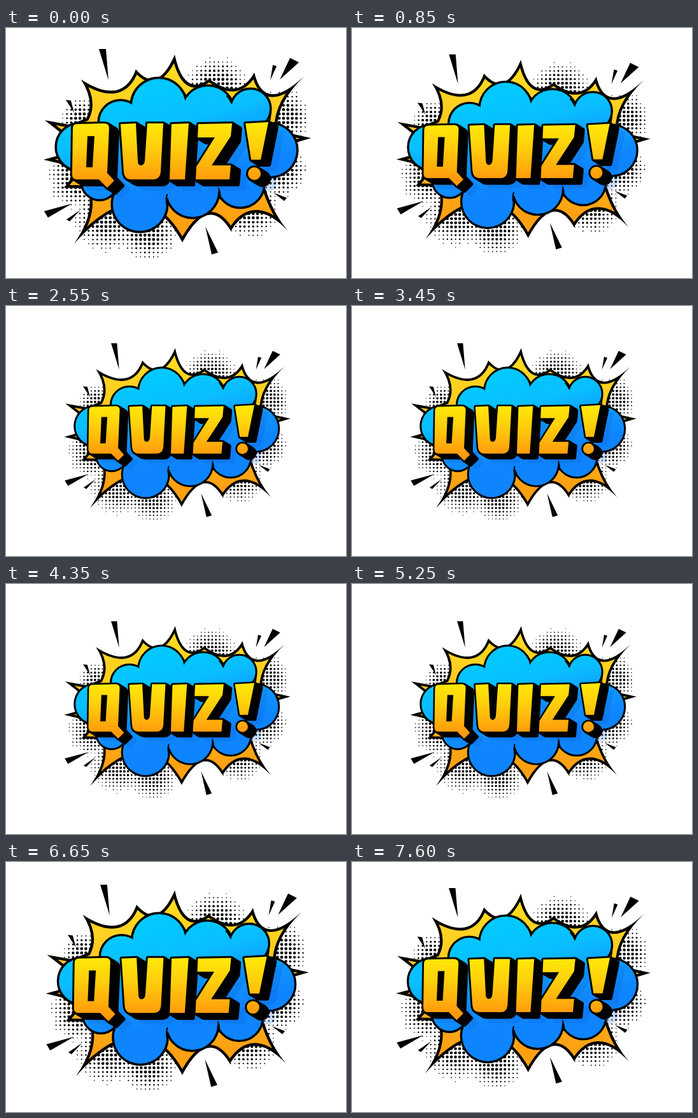
Write an HTML page that moves like this. It is 534 by 393 pixels and loops after 7650 ms.

```html
<!DOCTYPE html>
<html lang="en">
<head>
<meta charset="utf-8">
<title>Quiz burst</title>
<style>
  html, body { margin: 0; width: 100%; height: 100%; overflow: hidden; background: #fff; }
  svg { display: block; width: 100vw; height: 100vh; }
</style>
</head>
<body>
<svg viewBox="0 0 534 393" role="img" aria-label="QUIZ!">
  <defs>
    <linearGradient id="blue" gradientUnits="userSpaceOnUse" x1="0" y1="160" x2="39" y2="310">
      <stop offset="0" stop-color="#02c8ff"/><stop offset=".35" stop-color="#0abeff"/>
      <stop offset=".8" stop-color="#1090ff"/><stop offset="1" stop-color="#0f84ff"/>
    </linearGradient>
    <linearGradient id="gold" gradientUnits="userSpaceOnUse" x1="0" y1="150" x2="0" y2="242">
      <stop offset="0" stop-color="#ffe808"/><stop offset=".4" stop-color="#ffcf0c"/>
      <stop offset="1" stop-color="#ff980c"/>
    </linearGradient>
    <linearGradient id="amber" gradientUnits="userSpaceOnUse" x1="0" y1="60" x2="0" y2="300">
      <stop offset="0" stop-color="#ffdc20"/><stop offset=".4" stop-color="#ffc822"/>
      <stop offset="1" stop-color="#fda012"/>
    </linearGradient>
    <path id="star" d="M118,81 Q183,123 204,65 Q238,105 265,42 Q280,110 319,80 Q365,115 390,70
      Q405,135 468,76 Q425,118 426,158 L452,167 L479,173 L452,181 L405,245 Q418,290 443,319
      Q388,262 353,319 Q318,260 277,337 Q215,220 107,339 Q138,295 130,260 L124,252 L91,251
      L108,230 L84,213 L59,207 L84,200 L84,163 L61,145 L100,152 L126,142 Q140,115 118,81Z"/>
    <clipPath id="starClip"><use href="#star"/></clipPath>
    <path id="word" fill-rule="evenodd" d="
      M112,151 L154,150 Q162,150 162,157 L159,228 L170,240 L159,251 L146,238 H111 Q104,238 104,230 L105,158 Q105,151 112,151Z
      M128,170 L126,219 H136 L139,170Z
      M180,151 L204,150 L207,209 Q207,216 212,216 Q217,216 218,209 L222,150 H247 L243,226 Q242,238 231,238 H196 Q186,238 185,226Z
      M260,151 L287,150 L281,238 H257Z
      M302,151 L355,150 L353,170 L323,216 H353 L351,238 H298 L299,218 L328,172 H301Z
      M376,150 L412,148 L400,207 H385Z
      M380,229 A10,10 0 1 1 400,229 A10,10 0 1 1 380,229Z"/>
  </defs>
  <rect width="534" height="393" fill="#fff"/>
  <g id="burst">
    <path id="dots"/>
    <path d="M146,33 L157,33 L161,82Z M446,47 L460,54 L430,81Z M419,58 L425,60 L415,82Z
      M94,113 L102,114 L107,133Z M60,288 L66,298 L104,276Z M95,301 L100,304 L117,286Z
      M313,312 L333,353 L323,356Z M420,259 L441,267 L437,272Z"/>
    <g clip-path="url(#starClip)">
      <use href="#star" fill="url(#amber)" stroke="#000" stroke-width="9"/>
    </g>
    <g id="outline" stroke="#000" stroke-width="7"></g>
    <g id="cloud" fill="url(#blue)"></g>
    <path fill="none" stroke="#000" stroke-width="2.2" stroke-linecap="round"
      d="M283,108 Q281,102 275,98 M354,118 Q351,111 347,107
      M415,134 Q416,142 412,150 M254,282 Q250,272 253,262 M336,268 Q337,260 334,252"/>
    <use href="#word" transform="translate(23,15)" fill="#0758c8" stroke="#0758c8" stroke-width="5" opacity=".2"/>
    <g id="depth" stroke="#000" stroke-width="6" stroke-linejoin="round"></g>
    <use href="#word" fill="url(#gold)"/>
  </g>
</svg>
<script>
const LOOP = 7650, BEAT = 900, RISE = 300, STEP = 50;
const LEAD = 150;              // the loop opens halfway up a beat
const SMALL = 0.846, LARGE = 1.155;
const CX = 269.5, CY = 199;
const $ = id => document.getElementById(id);

const lobes = [
  [116, 187, 37], [180, 148, 34], [240, 122, 43], [317, 132, 41], [384, 127, 31],
  [415, 192, 42], [368, 245, 37], [293, 257, 41], [210, 277, 43], [147, 242, 28]
];
const circles = lobes.map(([x, y, r]) => `<circle cx="${x}" cy="${y}" r="${r - 1}"/>`).join('');
$('outline').innerHTML = circles;
$('cloud').innerHTML = circles + '<path d="M120,160 L240,110 L390,130 L430,200 L370,250 L200,275 L120,220Z"/>';

const DEPTH_X = 13, DEPTH_Y = 8;
let depth = '';
for (let i = 0; i <= DEPTH_X; i++)
  depth += `<use href="#word" transform="translate(${i},${(i * DEPTH_Y / DEPTH_X).toFixed(2)})"/>`;
$('depth').innerHTML = depth;

// Halftone: dots on a square grid shrink unevenly away from a few centres.
const patches = [
  [330, 95, 52], [120, 145, 36], [112, 236, 50], [160, 298, 56], [222, 318, 50],
  [436, 138, 44], [430, 222, 46], [382, 285, 48]
];
const PITCH = 6.8;
const noise = (i, j) => Math.abs(Math.sin(i * 12.9898 + j * 78.233) * 43758.5453) % 1;
let dots = '';
for (let j = 0; j < 48; j++) {
  for (let i = 0; i < 64; i++) {
    const x = 55 + i * PITCH, y = 40 + j * PITCH;
    const near = Math.max(...patches.map(([px, py, size]) => 1 - Math.hypot(x - px, y - py) / size))
      - 0.15 * noise(i, j);
    if (near < 0) continue;
    const r = Math.min(2.4, 0.7 + near * 3);
    dots += `M${(x - r).toFixed(2)},${y.toFixed(2)}a${r},${r} 0 1 0 ${2 * r},0a${r},${r} 0 1 0 ${-2 * r},0`;
  }
}
$('dots').setAttribute('d', dots);

// Steady growth, then a decelerating return.
function scaleAt(time) {
  const phase = (time + LEAD) % BEAT;
  const lift = phase < RISE
    ? phase / RISE
    : ((BEAT - phase) / (BEAT - RISE)) ** 2;
  return SMALL + (LARGE - SMALL) * lift;
}

function draw(ms) {
  const time = Math.floor((ms % LOOP) / STEP) * STEP;
  $('burst').setAttribute('transform',
    `translate(${CX},${CY}) scale(${scaleAt(time).toFixed(4)}) translate(${-CX},${-CY})`);
}

const start = performance.now();
function tick() {
  draw(performance.now() - start);
  requestAnimationFrame(tick);
}
draw(0);
requestAnimationFrame(tick);
</script>
</body>
</html>
```
